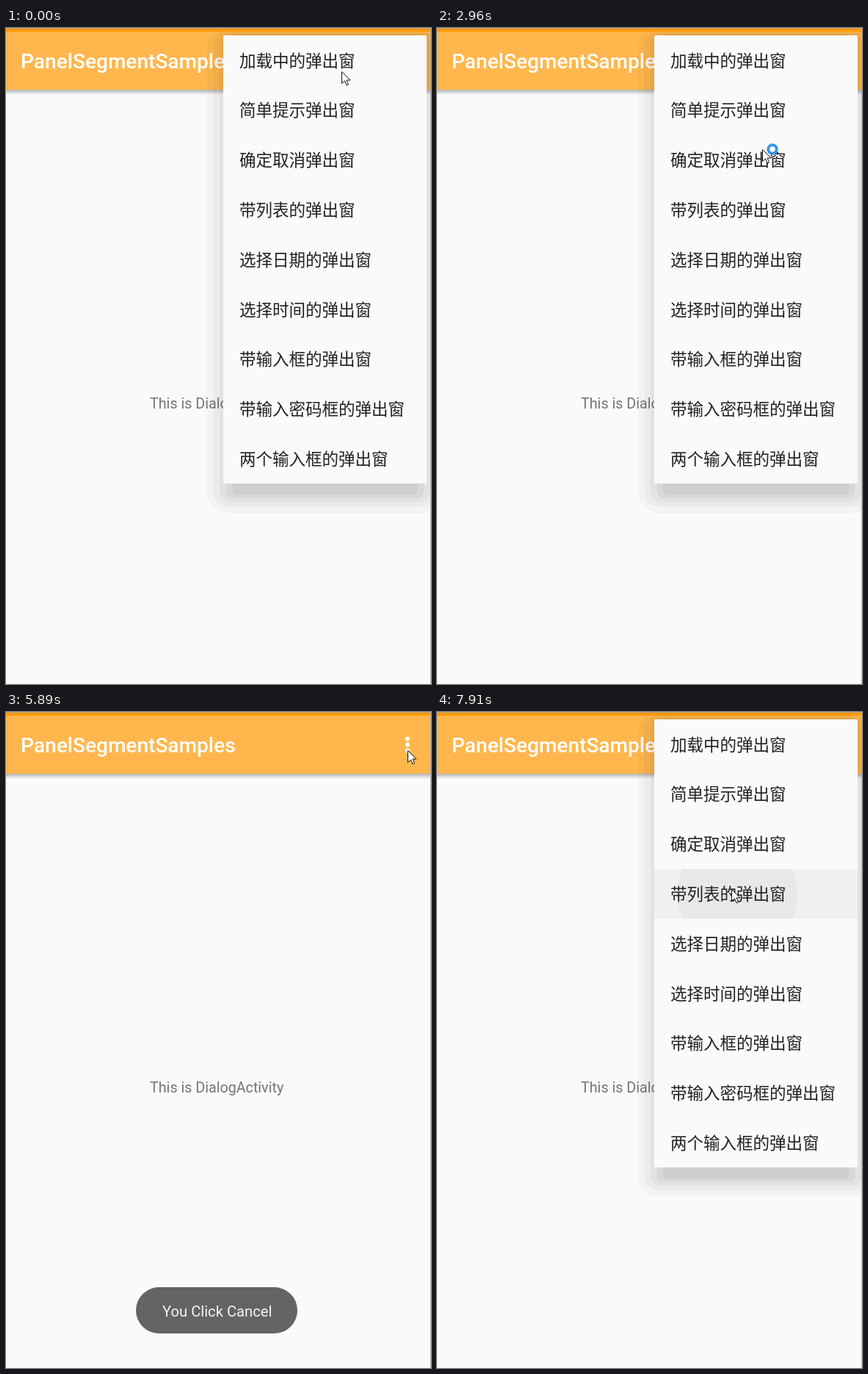
Animation, 579 px wide and 893 px high, one loop 8 s. Source, as an HTML page with a canvas:

```html
<!DOCTYPE html>
<html lang="zh">
<head>
<meta charset="utf-8">
<style>
html, body { margin: 0; width: 100%; height: 100%; overflow: hidden; background: #fafafa; }
canvas { display: block; }
</style>
</head>
<body>
<canvas id="stage" width="579" height="893"></canvas>
<script>
const ctx = document.getElementById('stage').getContext('2d');
const LOOP = 8000, TICK = LOOP / 60, FADE = 2 * TICK;
const FONT = 'Roboto, "Noto Sans CJK SC", "Noto Sans CJK", sans-serif';
const ITEMS = ['加载中的弹出窗', '简单提示弹出窗', '确定取消弹出窗', '带列表的弹出窗', '选择日期的弹出窗',
  '选择时间的弹出窗', '带输入框的弹出窗', '带输入密码框的弹出窗', '两个输入框的弹出窗'];
const ROW = 67.8;

// Pointer moves: start, end, x, y
const MOVES = [[500, 1200, 520, 33], [1333, 1600, 550, 46], [2400, 3067, 430, 179],
  [4300, 4900, 547, 52], [6300, 7200, 401, 241]];
const PRESSES = [{ start: 267, row: 0 }, { start: 3467, row: 2 }, { start: 7600, row: 3 }];

const clamp = u => Math.max(0, Math.min(1, u));
const ease = u => u * u * (3 - 2 * u);
const shown = (t, on, off) => clamp((t - on) / FADE) * clamp(1 - (t - off) / FADE);

function pointer(t) {
  let x = 457, y = 59;
  for (const [start, end, toX, toY] of MOVES) {
    const u = ease(clamp((t - start) / (end - start)));
    x += (toX - x) * u;
    y += (toY - y) * u;
  }
  return [Math.round(x), Math.round(y)];
}

function rect(x, y, w, h, color) {
  ctx.fillStyle = color;
  ctx.fillRect(x, y, w, h);
}

function round(x, y, w, h, r, color) {
  ctx.fillStyle = color;
  ctx.beginPath();
  ctx.roundRect(x, y, w, h, r);
  ctx.fill();
}

function circle(x, y, r, color) {
  ctx.fillStyle = color;
  ctx.beginPath();
  ctx.arc(x, y, r, 0, 7);
  ctx.fill();
}

function arc(x, y, r, from, to, width, color) {
  ctx.strokeStyle = color;
  ctx.lineWidth = width;
  ctx.beginPath();
  ctx.arc(x, y, r, from, to);
  ctx.stroke();
}

function text(str, x, y, size, color, weight = 400) {
  ctx.font = `${weight} ${size}px ${FONT}`;
  ctx.fillStyle = color;
  ctx.fillText(str, x, y);
}

// Drop shadow in flat bands; it rises and gains bands as the panel appears
function shadow(x, y, w, h, alpha, hollow) {
  ctx.save();
  ctx.beginPath();
  ctx.rect(0, 5, 579, 888);
  if (hollow) ctx.rect(x, y, w, h);
  ctx.clip('evenodd');
  ctx.globalAlpha = clamp(2 * alpha);
  const lift = .65 + .35 * alpha;
  for (let i = 0; i < 1 + 4 * alpha; i++) {
    const side = (22 - 8.5 * i) * lift, top = 10 * .5 ** i * lift, bottom = 40 * .79 ** i * lift;
    round(x - side, y - top, w + 2 * side, h + top + bottom, 28 * .7 ** i * lift, `rgba(0,0,0,${.028 + .005 * i})`);
  }
  ctx.restore();
}

function panel(x, y, w, h, color, alpha, hollow, content) {
  if (!alpha) return;
  shadow(x, y, w, h, alpha, hollow);
  ctx.globalAlpha = alpha;
  round(x, y, w, h, 2, color);
  content();
  ctx.globalAlpha = 1;
}

function drawPage() {
  rect(0, 0, 579, 893, '#fafafa');
  const g = ctx.createLinearGradient(0, 84, 0, 91);
  g.addColorStop(0, 'rgba(0,0,0,.28)');
  g.addColorStop(1, 'rgba(0,0,0,0)');
  rect(0, 84, 579, 7, g);
  rect(0, 5, 579, 79, '#ffb74d');
  rect(0, 0, 579, 5, '#ff9800');
  rect(0, 0, 579, 1, '#b3a48c');
  text('PanelSegmentSamples', 20, 55, 28.1, '#fff', 500);
  for (let i = -1; i < 2; i++) circle(547, 44.5 + 8 * i, 2.9, '#fff');
  text('This is DialogActivity', 196, 518, 19.7, '#757575');
}

function drawRipple(t, { start, row }) {
  const u = (t - start) / FADE, y = 10.4 + row * ROW;
  if (u < 0 || u > 1.3) return;
  ctx.save();
  ctx.beginPath();
  ctx.rect(296, y, 277, ROW);
  ctx.clip();
  rect(296, y, 277, ROW, `rgba(0,0,0,${.04 * clamp(u)})`);
  circle(pointer(t)[0] + 8 * u, y + ROW / 2, 82 * u, 'rgba(0,0,0,.035)');
  ctx.restore();
}

function drawMenu(t) {
  const alpha = Math.max(shown(t, -LOOP, 533), shown(t, 2267, 3733), shown(t, 5867, LOOP));
  panel(296, 10, 277, 610, '#fafafa', alpha, false, () => {
    PRESSES.forEach(p => drawRipple(t, p));
    ITEMS.forEach((s, i) => text(s, 318, 52.6 + i * ROW, 22.5, '#212121'));
  });
}

function drawSpinner(t) {
  const cycle = (t - 1200) / 1333 + .5, p = cycle % 1;
  const turn = 216 * cycle + 90 * p - 145;
  const tail = turn + 270 * ease(clamp(2 * p - 1));
  const head = turn + 270 * ease(clamp(2 * p)) + 12;
  arc(220.5, 470.5, 27, tail * Math.PI / 180, head * Math.PI / 180, 5.6, '#3f51b5');
}

function drawLoading(t) {
  panel(153, 411, 269, 118, '#fafafa', shown(t, 533, 1733), true, () => {
    drawSpinner(t);
    text('正在加载中', 289, 478, 19.7, '#757575');
  });
}

function drawConfirm(t) {
  panel(155, 397, 265, 147, '#fff', shown(t, 3707, 5093), true, () => {
    text('是否选择 Velunor?', 189.5, 446, 22.5, '#212121');
    text('取消', 247, 511.5, 19.7, '#3f51b5', 500);
    text('确定', 337.5, 511.5, 19.7, '#3f51b5', 500);
  });
}

function drawToast(t) {
  ctx.globalAlpha = shown(t, 5333, 7200);
  round(177, 783, 220, 63, 31.5, '#646464');
  text('You Click Cancel', 213, 822.5, 20.2, '#f4f4f4');
  ctx.globalAlpha = 1;
}

const ARROW = new Path2D('M0 0V16L4 12.5L6.5 18.5L9 17.5L6.5 11.5H11.5Z');

function drawPointer(t) {
  const [x, y] = pointer(t);
  ctx.save();
  ctx.translate(x + .5, y + .5);
  ctx.fillStyle = '#fff';
  ctx.strokeStyle = '#111';
  ctx.lineWidth = 1;
  ctx.fill(ARROW);
  ctx.stroke(ARROW);
  if (t > 2500 && t < 5300) arc(13.5, -.5, 5.7, 0, 7, 4, '#3498ec');
  ctx.restore();
}

function frame(now) {
  const t = TICK * Math.min(59, Math.floor((now % LOOP + 40) / TICK));
  drawPage();
  drawMenu(t);
  drawLoading(t);
  drawConfirm(t);
  drawToast(t);
  rect(578, 0, 1, 893, '#b4b4b4');
  drawPointer(t);
  requestAnimationFrame(frame);
}
requestAnimationFrame(frame);
</script>
</body>
</html>
```
